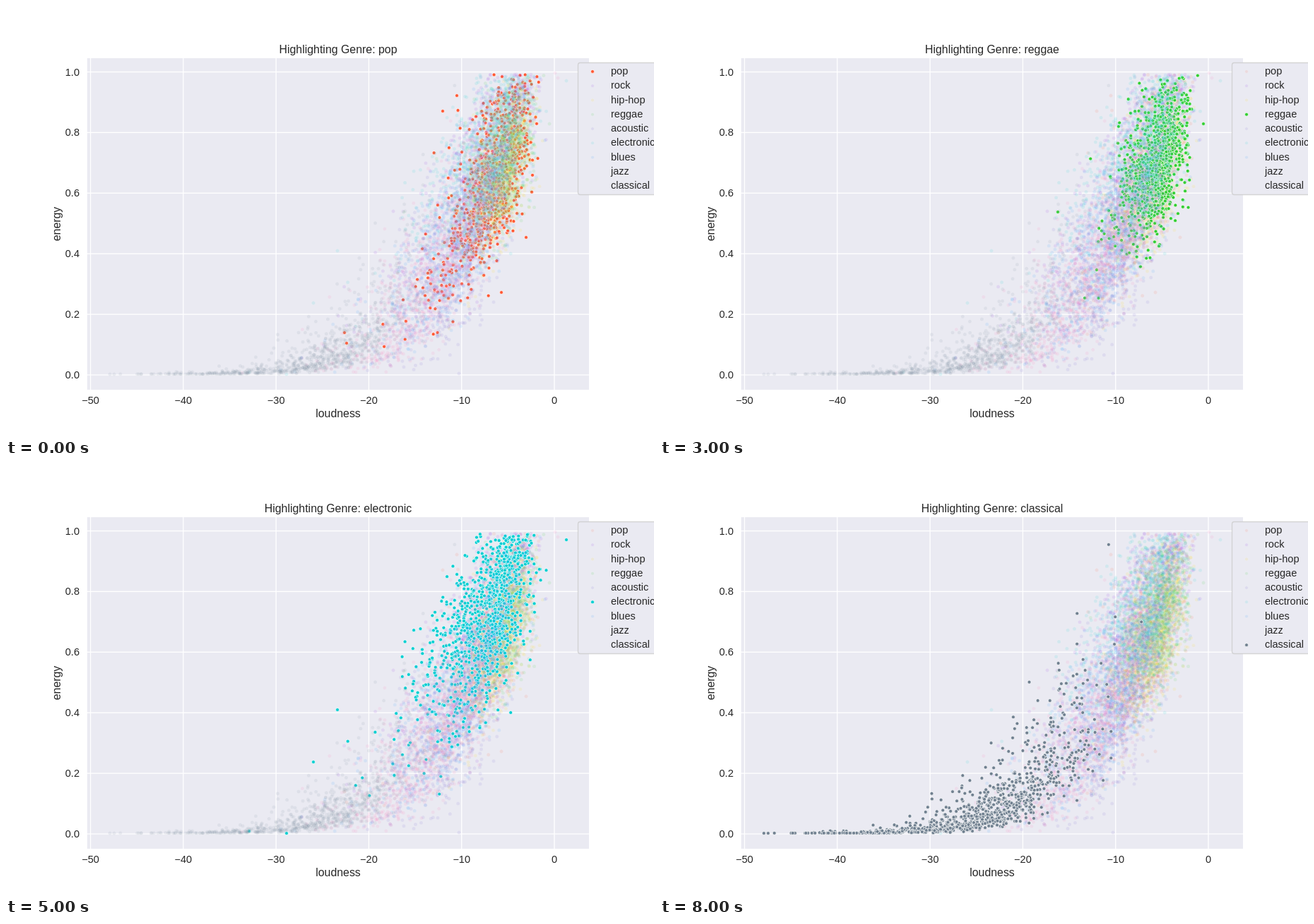
Animation, 917 px wide and 611 px high, one loop 9 s. Source, as an HTML page with a canvas:

```html
<!DOCTYPE html>
<html>
<head>
<meta charset="utf-8">
<style>
  html, body { margin: 0; width: 100%; height: 100%; overflow: hidden; background: #fff; }
  canvas, svg { position: absolute; left: 0; top: 0; }
  text { font: 14.55px "Liberation Sans", Arial, sans-serif; fill: #262626; }
  .mid { text-anchor: middle; }
  .end { text-anchor: end; }
  .big { font-size: 15.9px; }
</style>
</head>
<body>
<canvas id="plot" width="917" height="611"></canvas>
<svg id="overlay" width="917" height="611">
  <rect x="809.5" y="80.5" width="125" height="187" rx="3" fill="#eaeaf2" stroke="#ccc" stroke-opacity=".8" stroke-width="1.3"/>
  <text id="title" class="mid big" x="470" y="67"></text>
  <text class="mid big" x="470" y="583">loudness</text>
  <text class="mid big" transform="translate(77 309) rotate(-90)">energy</text>
</svg>
<script>
const ctx = document.getElementById('plot').getContext('2d');
const overlay = document.getElementById('overlay');
const title = document.getElementById('title');
const STEP = 1000, DIM = 0.1, R = 2.5, EDGE = 0.7;
const tickX = i => 119.6 + 131.28 * i;
const energyY = e => 523 - 429.5 * e;

// Typical x of a point at each of these energies, per genre
const knots = [0.01, 0.1, 0.3, 0.5, 0.7, 0.95].map(Math.log);
const genres = [
  { name: 'pop', color: '#ff5733', n: 900, mean: 0.65, sd: 0.19, spread: 25,
    xs: [440, 545, 628, 676, 702, 722], extra: [[479, 463], [482, 478], [638, 127], [618, 149], [701, 406], [736, 328]] },
  { name: 'rock', color: '#8a2be2', n: 900, mean: 0.78, sd: 0.27, spread: 31,
    xs: [420, 530, 602, 650, 684, 722], extra: [[482, 453], [548, 291]] },
  { name: 'hip-hop', color: '#ffd700', n: 1000, mean: 0.66, sd: 0.14, spread: 22,
    xs: [480, 580, 650, 685, 708, 727] },
  { name: 'reggae', color: '#32cd32', n: 1000, mean: 0.71, sd: 0.13, spread: 25,
    xs: [480, 570, 645, 683, 706, 726], extra: [[563, 292], [601, 414], [769, 167]] },
  { name: 'acoustic', color: '#6a5acd', n: 1000, mean: 0.42, sd: 0.22, spread: 28,
    xs: [510, 580, 628, 662, 692, 718], extra: [[641, 521]] },
  { name: 'electronic', color: '#00ced1', n: 1000, mean: 0.74, sd: 0.2, spread: 34,
    xs: [400, 520, 612, 650, 682, 714], extra: [[793, 106], [469, 347], [435, 421], [397, 522], [344, 519]] },
  { name: 'blues', color: '#1e90ff', n: 1000, mean: 0.52, sd: 0.24, spread: 30,
    xs: [440, 550, 615, 655, 687, 716] },
  { name: 'jazz', color: '#ff69b4', n: 950, mean: 0.32, sd: 0.26, spread: 30,
    xs: [475, 545, 605, 648, 674, 714], extra: [[777, 95], [781, 102], [334, 520]] },
  { name: 'classical', color: '#708090', n: 950, mean: 0.12, spread: 31,
    xs: [365, 490, 568, 605, 630, 650], extra: [[147, 522], [153, 522], [643, 254]] }
];

let seed = 7;
function random() {
  seed = (seed + 0x6d2b79f5) | 0;
  let t = Math.imul(seed ^ (seed >>> 15), 1 | seed);
  t = (t + Math.imul(t ^ (t >>> 7), 61 | t)) ^ t;
  return ((t ^ (t >>> 14)) >>> 0) / 4294967296;
}
const gauss = () => Math.sqrt(-2 * Math.log(1 - random())) * Math.cos(2 * Math.PI * random());

function centerX(xs, energy) {
  const l = Math.log(energy);
  let i = 0;
  while (i < knots.length - 2 && l > knots[i + 1]) i++;
  return xs[i] + (xs[i + 1] - xs[i]) * (l - knots[i]) / (knots[i + 1] - knots[i]);
}

// Louder, more energetic points lie closer together, with a longer tail to the left
function scatter({ n, mean, sd, spread, xs, extra = [] }) {
  const points = [...extra];
  const minX = sd ? 346 : 158, minE = sd ? 0.008 : 0.0004;
  while (points.length < n) {
    const e = sd ? mean + sd * gauss() : mean * Math.abs(gauss()) ** 1.5;
    if (e < minE || e > 0.993) continue;
    const g = gauss();
    const x = centerX(xs, e) + spread * (1.25 - 0.6 * e) * g * (g < 0 ? 1.25 : 0.85);
    if (x > minX && x < 768) points.push([x, Math.min(energyY(e), 521.8)]);
  }
  return points;
}

function add(tag, attrs, text = '') {
  const el = document.createElementNS('http://www.w3.org/2000/svg', tag);
  for (const k in attrs) el.setAttribute(k, attrs[k]);
  el.textContent = text;
  return overlay.appendChild(el);
}

for (let i = 0; i < 6; i++) {
  add('text', { class: 'mid', x: tickX(i), y: 564 }, i < 5 ? '\u2212' + (50 - 10 * i) : '0');
  add('text', { class: 'end', x: 104, y: energyY(i / 5) + 5 }, (i / 5).toFixed(1));
}
genres.forEach((g, i) => {
  const y = 92.4 + 20.28 * i;
  g.points = scatter(g);
  g.key = add('circle', { cx: 830, cy: y + 0.5, r: R, fill: g.color, stroke: '#fff', 'stroke-width': EDGE });
  add('text', { x: 856, y: y + 4.6 }, g.name);
});

function draw(active) {
  ctx.globalAlpha = 1;
  ctx.clearRect(0, 0, 917, 611);
  ctx.fillStyle = '#eaeaf2';
  ctx.fillRect(115, 74, 710, 470);
  ctx.fillStyle = '#fff';
  for (let i = 0; i < 6; i++) {
    ctx.fillRect(tickX(i) - 0.65, 74, 1.3, 470);
    ctx.fillRect(115, energyY(i / 5) - 0.65, 710, 1.3);
  }
  ctx.strokeStyle = '#fff';
  ctx.lineWidth = EDGE;
  genres.forEach((g, i) => {
    const on = i === active;
    ctx.globalAlpha = on ? 1 : DIM;
    ctx.fillStyle = g.color;
    for (const [x, y] of g.points) {
      ctx.beginPath();
      ctx.arc(x, y, R, 0, 2 * Math.PI);
      ctx.fill();
      ctx.stroke();
    }
    g.key.setAttribute('opacity', on ? 1 : i < 7 ? DIM : 0);
  });
  title.textContent = 'Highlighting Genre: ' + genres[active].name;
}

let shown = -1, start;
function tick(now) {
  start ??= now;
  const active = Math.floor((now - start) / STEP) % genres.length;
  if (active !== shown) draw(shown = active);
  requestAnimationFrame(tick);
}
requestAnimationFrame(tick);
</script>
</body>
</html>
```
